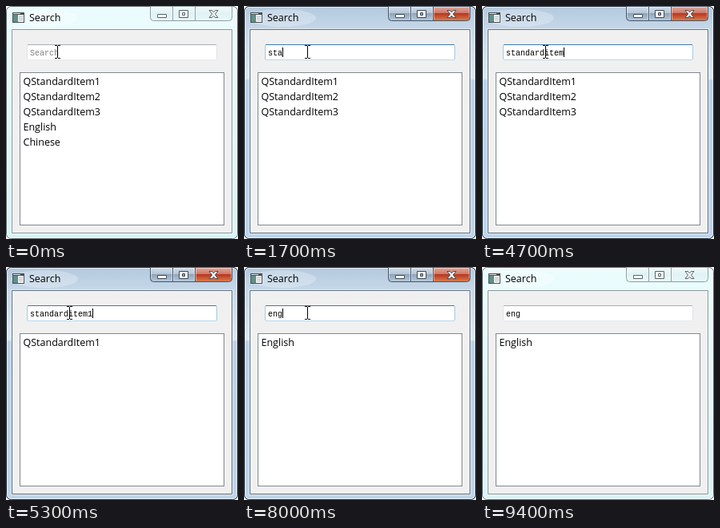
An HTML page for the animation above (9.5 s loop, 290 by 292 pixels).

```html
<!DOCTYPE html>
<html lang="en">
<head>
<meta charset="utf-8">
<title>Search</title>
<style>
html, body { margin: 0; width: 100%; height: 100%; overflow: hidden; background: #fff; }
svg { display: block; width: 290px; height: 292px; }
text { font: 12.5px "Open Sans", "Noto Sans", sans-serif; white-space: pre; }
#edit { font: 10px "Liberation Mono", "Noto Sans Mono", monospace; }
</style>
</head>
<body>
<svg viewBox="0 0 290 292">
  <defs id="defs"></defs>
  <g id="idle"></g>
  <g id="active"></g>

  <g shape-rendering="crispEdges">
    <path d="M8 8h15v13h-15z" fill="#4b5052"/>
    <path d="M9 11h6v9h-6z" fill="#5f9088"/>
    <path d="M15 11h7v9h-7z" fill="#f4f6f6"/>
    <path d="M9 9h9v1h-9z" fill="#dfe5e8"/>
    <path d="M16 13h5v1h-5zM16 15h5v1h-5zM16 17h5v1h-5z" fill="#b9c2c4"/>
    <path d="M17.5 83.5h255v191h-255z" fill="#fff" stroke="#828790"/>
  </g>
  <text x="29" y="19">Search</text>
  <text id="edit" x="30" y="62"></text>
  <rect id="caret" y="52" width="1" height="12"/>
  <g id="list"></g>

  <g id="beam" fill="none" stroke="#000" shape-rendering="crispEdges">
    <path d="M-3 -7.5h3m1 0h3M.5 -7v15M-3 8.5h3m1 0h3"/>
  </g>
  <path id="arrow" d="M.5 .5v16l3.7 -3.5 2.5 5.5 2.3 -1 -2.4 -5.4h5z" fill="#fff" stroke="#000"/>
</svg>

<script>
const $ = id => document.getElementById(id);
const LOOP = 9500;
const items = ['QStandardItem1', 'QStandardItem2', 'QStandardItem3', 'English', 'Chinese'];

// Contents of the search field from each time on
const edits = [
  [0, ''], [1300, 's'], [1500, 'st'], [1700, 'sta'], [2100, 'stan'], [2400, 'stand'],
  [3200, 'standa'], [3400, 'standar'], [3800, 'standard'], [4000, 'standardi'],
  [4300, 'standardit'], [4400, 'standardite'], [4700, 'standarditem'],
  [5300, 'standarditem1'], [5800, 'standarditem'], [5900, 'standardite'],
  [6100, 'standardit'], [6600, 'standar'], [6700, 'stan'], [6800, 's'], [6900, ''],
  [7300, 'e'], [7500, 'en'], [8000, 'eng']
];
const caretOff = [[0, 400], [1000, 1300], [3000, 3200], [8600, 9100], [9300, LOOP]];

const looks = {
  idle: {
    frame: ['#ecfcfd', '#e2f9fc 40', '#d9f3f6'], edge: '#59676c', inner: '#8b979b',
    button: ['#f1fbfc', '#e0f2f5 50', '#e8f9fb'], close: ['#f1fbfc', '#e0f2f5 50', '#e8f9fb'],
    line: '#8f9da2', glyph: '#586468', field: ['#abadb3', '#e2e3ea', '#e3e9ef']
  },
  active: {
    frame: ['#b4c9de', '#c6d8e9 10', '#dbe8f3 31', '#b9d1e9 32', '#bdd4eb'], edge: '#202a32', inner: '#62707d',
    button: ['#d3deea', '#b4c4d5 48', '#8fa4ba 50', '#b6cadd'],
    close: ['#e3ab9e', '#cd7565 48', '#b8361f 50', '#d9804f'],
    line: '#46566a', glyph: '#3e4954', field: ['#3d7bad', '#a4c9e3', '#b7d9ed']
  }
};

function gradient(id, stops) {
  const marks = stops.map((s, i) => {
    const [color, at = i ? 100 : 0] = s.split(' ');
    return `<stop offset="${at}%" stop-color="${color}"/>`;
  });
  $('defs').innerHTML += `<linearGradient id="${id}" x2="0" y2="1">${marks.join('')}</linearGradient>`;
}

function drawWindow(name) {
  const c = looks[name], fill = part => `url(#${name}-${part})`;
  for (const part of ['frame', 'button', 'close']) gradient(`${name}-${part}`, c[part]);
  const [top, side, bottom] = c.field;
  $(name).innerHTML = `
    <rect x=".5" y=".5" width="289" height="291" rx="6" fill="${fill('frame')}" stroke="${c.edge}"/>
    <rect x="1.5" y="1.5" width="287" height="289" rx="5" fill="none" stroke="#fff" stroke-opacity=".65"/>
    <ellipse cx="48" cy="15" rx="42" ry="11" fill="#fff" opacity=".25"/>
    <path d="M6.5 28.5h277v257h-277z" fill="none" stroke="#fff" stroke-opacity=".5"/>
    <path d="M7.5 29.5h275v255h-275z" fill="#f0f0f0" stroke="${c.inner}"/>
    <g stroke="${c.line}">
      <path d="M180.5 .5h28v18h-24q-4 0 -4 -4z" fill="${fill('button')}"/>
      <path d="M208.5 .5h28v18h-28z" fill="${fill('button')}"/>
      <path d="M236.5 .5h46v14q0 4 -4 4h-42z" fill="${fill('close')}"/>
    </g>
    <path d="M181.5 14V1.5h26V17M209.5 17V1.5h26V17M237.5 17V1.5h44V14" fill="none" stroke="#fff" stroke-opacity=".45"/>
    <g fill="#fff" stroke="${c.glyph}">
      <path d="M189.5 10.5h11v4h-11z"/>
      <path fill-rule="evenodd" d="M216.5 5.5h11v9h-11zM220.5 8.5h3v3h-3z"/>
      <path d="M254 5.5h3.5l2 2.3 2 -2.3h3.5l-3.6 4.5 3.6 4.5h-3.5l-2 -2.3 -2 2.3h-3.5l3.6 -4.5z"/>
    </g>
    <path d="M26.5 48.5h237v19h-237z" fill="#fff"/>
    <path d="M27 48.5h236" stroke="${top}"/>
    <path d="M26.5 49v18M263.5 49v18" stroke="${side}"/>
    <path d="M27 67.5h236" stroke="${bottom}"/>`;
}

const clamp = v => Math.max(0, Math.min(1, v));
const show = (el, on) => el.setAttribute('visibility', on ? 'visible' : 'hidden');

function render(t) {
  const focus = t < 5000 ? clamp((t - 200) / 300) : clamp((9400 - t) / 200);
  $('active').setAttribute('opacity', focus);

  const text = edits.findLast(e => e[0] <= t)[1];
  $('edit').textContent = text || 'Search';
  $('edit').setAttribute('fill', text ? '#000' : '#808080');
  $('caret').setAttribute('x', 30 + 6 * text.length);
  show($('caret'), !caretOff.some(([from, to]) => t >= from && t < to));

  $('list').innerHTML = items.filter(s => s.toLowerCase().includes(text))
    .map((s, i) => `<text x="21.5" y="${99 + 19 * i}">${s}</text>`).join('');

  // The pointer settles in the field, later drops out past the list
  const leave = Math.max(0, (t - 8700) / 300);
  const x = Math.round(64 + 15 * clamp(t / 200) + 40 * leave);
  const y = Math.round(57 + 172 * leave * leave);
  for (const id of ['beam', 'arrow']) $(id).setAttribute('transform', `translate(${x} ${y})`);
  show($('beam'), !leave);
  show($('arrow'), leave > 0 && t < 9100);
}

function tick(now) {
  render(Math.floor(now % LOOP / 100) * 100);
  requestAnimationFrame(tick);
}

drawWindow('idle');
drawWindow('active');
render(0);
requestAnimationFrame(tick);
</script>
</body>
</html>
```
